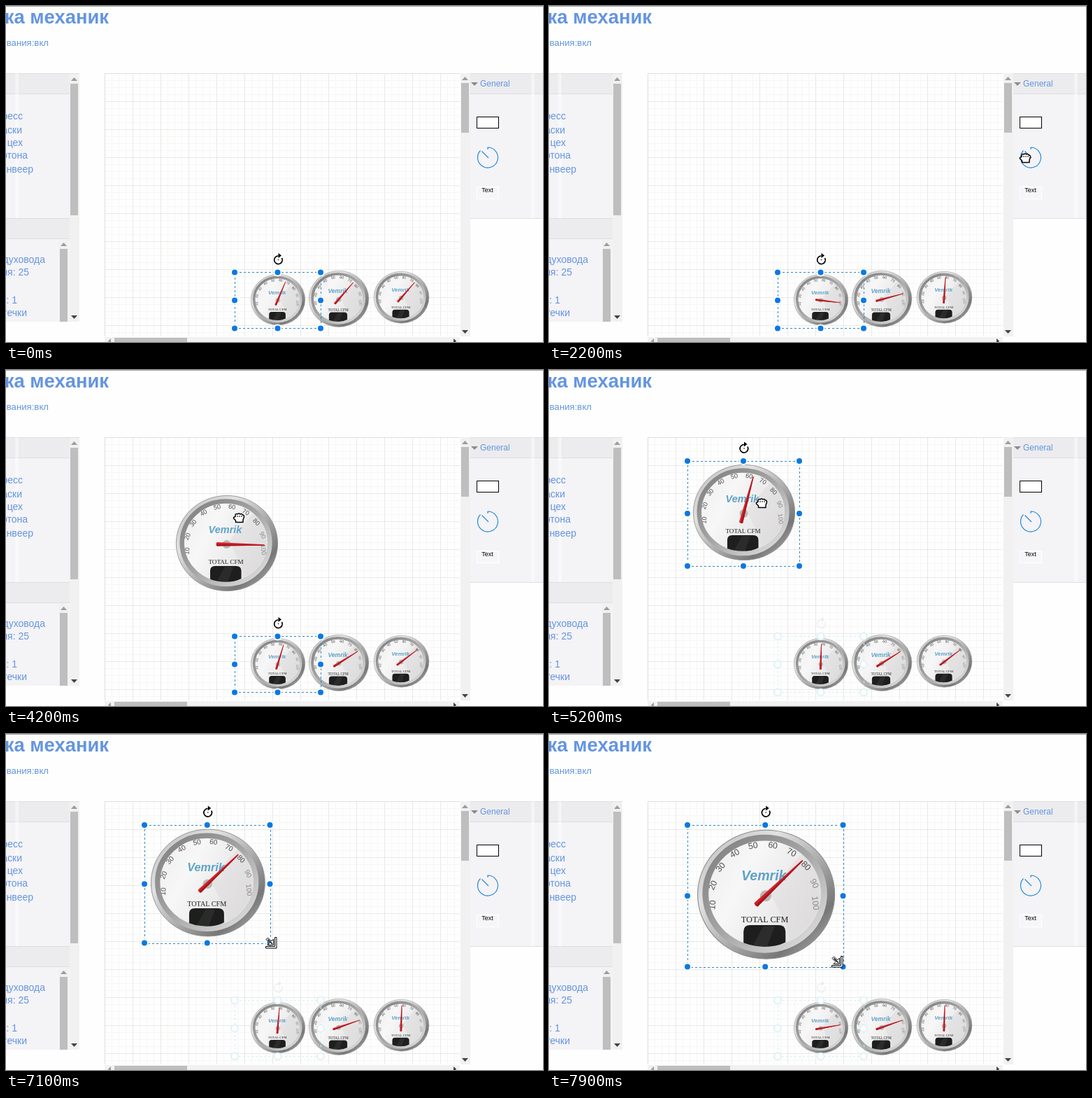
An HTML page that plays this animation: 768x480 px, repeating every 8000 ms.

```html
<!DOCTYPE html>
<html lang="ru">
<head>
<meta charset="utf-8">
<title>Panel editor</title>
<style>
  html, body { margin: 0; width: 100%; height: 100%; overflow: hidden; background: #fefefe; }
  svg { display: block; width: 768px; height: 480px; font-family: "Liberation Sans", Arial, sans-serif; }
  .blue { fill: #6495e0; }
  .end { text-anchor: end; }
  .mid { text-anchor: middle; }
  .line { fill: none; stroke: #dedee0; }
  .dash { fill: none; stroke: #2f86c8; stroke-dasharray: 3 3; shape-rendering: crispEdges; }
  .dot { fill: #0b78e3; stroke: #fff; stroke-width: 2; }
  .ghost .dash { stroke: #d3f0f8; }
  .ghost .dot { fill: #fdfefe; stroke: #dceff4; stroke-width: 1.500; }
  .ghost .turn { opacity: .05; }
</style>
</head>
<body>
<svg viewBox="0 0 768 480">
  <defs>
    <linearGradient id="rim" x1="0.1" y1="0.1" x2="0.9" y2="0.9">
      <stop offset="0" stop-color="#c4c4c4"/>
      <stop offset="0.25" stop-color="#e2e2e2"/>
      <stop offset="0.55" stop-color="#b0b0b0"/>
      <stop offset="0.85" stop-color="#777"/>
      <stop offset="1" stop-color="#a0a0a0"/>
    </linearGradient>
    <linearGradient id="bevel" x1="0.1" y1="0.1" x2="0.9" y2="0.9">
      <stop offset="0" stop-color="#858585"/>
      <stop offset="0.5" stop-color="#a6a6a6"/>
      <stop offset="1" stop-color="#d8d8d8"/>
    </linearGradient>
    <linearGradient id="dial" x1="0" y1="0" x2="1" y2="0.5">
      <stop offset="0" stop-color="#ededed"/>
      <stop offset="0.4" stop-color="#f8f7f7"/>
      <stop offset="1" stop-color="#e2e1e1"/>
    </linearGradient>
    <pattern id="minor" x="141" y="96" width="10" height="10" patternUnits="userSpaceOnUse">
      <path d="M.5 0V10M0 .5H10" fill="none" stroke="#f6f6f5"/>
    </pattern>
    <pattern id="major" x="141" y="96" width="40" height="40" patternUnits="userSpaceOnUse">
      <path d="M.5 0V40M0 .5H40" fill="none" stroke="#e8e8e7"/>
    </pattern>
    <clipPath id="view"><rect x="141" y="96" width="508" height="376"/></clipPath>
  </defs>

  <rect width="768" height="480" fill="#fefefe"/>
  <path d="M0 .5H768" stroke="#a9a9a9"/>
  <text class="blue end" x="147" y="25" font-size="27.4" font-weight="bold">тка механик</text>
  <text class="blue end" x="61" y="57" font-size="13.2">обслуживания:вкл</text>

  <!-- left panel -->
  <rect y="96" width="105" height="355" fill="#f4f3f6"/>
  <path d="M0 96H91V125H0ZM0 304H91V333H0Z" fill="#ececee"/>
  <path class="line" d="M0 96.500H105M0 125.500H91M0 303.500H91M0 332.500H91"/>
  <rect x="13" y="96" width="5" height="207" fill="#fff" opacity=".4"/>
  <g id="lists" class="blue end" font-size="14"></g>
  <path d="M91 97H105V451H91ZM76 334H89V451H76Z" fill="#f1f1f2"/>
  <path d="M92 111H103V299H92ZM77 347H88V451H77Z" fill="#bebebe"/>
  <path d="M93 107L97.500 102L102 107ZM78 343L82.500 338L87 343Z" fill="#9c9c9c"/>
  <path d="M93 442H102L97.500 447Z" fill="#444"/>

  <!-- drawing area -->
  <rect x="141" y="96" width="508" height="376" fill="url(#minor)"/>
  <rect x="141" y="96" width="508" height="376" fill="url(#major)"/>
  <path class="line" d="M141.500 472V96.500H649"/>
  <path d="M650 96H664V472H650ZM141 473H649V480H141Z" fill="#f1f1f2"/>
  <path d="M651 110H662V181H651ZM155 474H259V480H155Z" fill="#bebebe"/>
  <path d="M652 106L656.500 101L661 106ZM150 475V480H147L146 478.500Z" fill="#9c9c9c"/>
  <path d="M652 463H661L656.500 468ZM640 475V480H643L644 478.500Z" fill="#444"/>

  <!-- shape palette -->
  <rect x="664" y="96" width="104" height="207" fill="#f4f3f6"/>
  <rect x="664" y="96" width="104" height="29" fill="#ececee"/>
  <path class="line" d="M664 96.500H768M664 125.500H768M664 303.500H768"/>
  <rect x="751" y="96" width="5" height="207" fill="#fff" opacity=".4"/>
  <path d="M665 109H675L670 114Z" fill="#8b8b8b"/>
  <text class="blue" x="678" y="115" font-size="12">General</text>
  <rect x="673.500" y="158.500" width="31" height="16" fill="#fff" stroke="#000"/>
  <path d="M689 205V202A14.500 14.500 0 1 1 678.500 206.500M680.500 207.500L690 217" fill="none" stroke="#1c86d8" stroke-width="1.100"/>
  <rect x="673.500" y="258.500" width="31" height="17" fill="#f6f5f8" stroke="#fff"/>
  <text class="mid" x="688.500" y="266" font-size="9">Text</text>

  <g id="scene" clip-path="url(#view)"></g>
  <g id="picks"></g>
  <g id="hand" fill="#fff" stroke="#000" stroke-width="1.500" stroke-linejoin="round">
    <path d="M-4.500 6.500V4L-7.500 1Q-8-1-5-1.500V-4Q-4-6.500-2-5Q0-7 2-5Q4-6.500 5-4Q7.500-4.500 7.500-1L6 3V6.500Z"/>
    <path d="M-2-3V-1M1-3V-1M4-3V-1" stroke-width="1"/>
  </g>
  <g id="resize" fill="#fff" stroke="#000">
    <path d="M5.500-7.500H8V8H-7.500V5.500H5.500Z"/>
    <path d="M-4.500-7L.5-2L3.500-5V3.500H-5L-2 .5L-7-4.500Z"/>
    <path d="M-4.500-4.500L2 2" stroke-width="1.500"/>
  </g>
</svg>
<script>
const LOOP = 8000, STEP = 100, MOVE = 400;
const W = 160, H = 150;
const $ = id => document.getElementById(id);
const place = (el, x, y, s = 1) => el.setAttribute('transform', `translate(${x} ${y}) scale(${s})`);
const show = (el, on) => el.setAttribute('visibility', on ? 'visible' : 'hidden');

$('lists').innerHTML = [
  ['Пресс', 24, 162], ['Окраски', 23, 182], ['цех', 24, 200], ['Картона', 31, 218], ['Конвеер', 39, 238],
  ['духовода', 56, 367], ['Давления: 25', 33, 385], ['Уровень: 1', 16, 425], ['Утечки', 30, 443]
].map(([s, x, y]) => `<text x="${x}" y="${y}">${s}</text>`).join('');

function gaugeMarkup() {
  let marks = '';
  for (let i = 0; i < 10; i++) {
    const a = -100 + 22 * i, r = a * Math.PI / 180;
    const x = 78.5 + 55.5 * Math.sin(r), y = 75 - 54.5 * Math.cos(r);
    const tone = i < 8 ? '#4c4c4c' : '#8a8a8a';
    marks += `<text transform="translate(${x} ${y}) rotate(${a * 0.85})" y="3.2" fill="${tone}">${10 * (i + 1)}</text>`;
  }
  return `
    <ellipse cx="81" cy="73.500" rx="72.600" ry="68.100" fill="url(#rim)" stroke="#8c8c8c" stroke-width=".8"/>
    <ellipse cx="79.500" cy="72.800" rx="62.500" ry="59" fill="url(#dial)"/>
    <path d="M84 70L121 28Q138 46 137 84Q130 108 106 122L102 105Z" fill="#dad8d8" opacity=".45"/>
    <g class="mid" font-size="9">${marks}</g>
    <text class="mid" x="78.500" y="58.800" font-size="14.500" font-weight="bold" font-style="italic" fill="#5da3c6">Vemrik</text>
    <text class="mid" x="79.500" y="103" font-size="9.100" fill="#222" font-family="Liberation Serif, Times, serif">TOTAL CFM</text>
    <path d="M57 127V113Q57 106 64 106H94Q101.500 106 101.500 113V124Q92 129 79 130Q66 130 57 127Z" fill="#1d1e1d"/>
    <path d="M66 129L78 107H90L82 129Z" fill="#343634" opacity=".6"/>
    <ellipse cx="79.500" cy="72.800" rx="62.800" ry="59.300" fill="none" stroke="url(#bevel)" stroke-width="6.500"/>
    <circle cx="80.500" cy="75" r="6" fill="#b9b7b7"/>
    <g class="needle">
      <path d="M77.300 88.500Q80 90.500 82.700 88.500L80.700 20.500H79.300Z" fill="#d3242b"/>
      <path d="M80 89L82.700 88.500L80.700 20.500H80Z" fill="#a5161d"/>
    </g>`;
}

function addGroup(parent, markup) {
  const g = document.createElementNS('http://www.w3.org/2000/svg', 'g');
  g.innerHTML = markup;
  $(parent).append(g);
  return g;
}

// turns: [start time, angle]; each change takes MOVE ms
function makeGauge(turns) {
  const g = addGroup('scene', gaugeMarkup());
  return { g, turns, needle: g.querySelector('.needle') };
}

const makePick = () => addGroup('picks', '<rect class="dash"/>' +
  '<circle class="dot" r="5"/>'.repeat(8) +
  `<g class="turn"><circle r="8" fill="#fff" opacity=".8"/>
   <path d="M0-4.500A5.800 5.800 0 1 0 5-1.500" fill="none" stroke="#000" stroke-width="1.700"/>
   <path d="M0-8.500V-1.500L4.500-5Z"/><circle cy="1" r=".8"/></g>`);

function setPick(g, x, y, w, h) {
  const box = g.querySelector('.dash');
  const edges = { x: Math.floor(x) + 0.5, y: Math.floor(y) + 0.5, width: Math.round(w), height: Math.round(h) };
  Object.entries(edges).forEach(([k, v]) => box.setAttribute(k, v));
  const dots = g.querySelectorAll('.dot');
  let n = 0;
  for (let j = 0; j < 3; j++)
    for (let i = 0; i < 3; i++)
      if (i !== 1 || j !== 1) place(dots[n++], x + w * i / 2, y + h * j / 2);
  place(g.querySelector('.turn'), x + w / 2 + 1, y - 19);
}

// linear path through [time, a, b] points
function along(keys, t) {
  if (t <= keys[0][0]) return keys[0].slice(1);
  for (let i = 1; i < keys.length; i++) {
    const [p, q] = [keys[i - 1], keys[i]];
    if (t <= q[0]) {
      const k = (t - p[0]) / (q[0] - p[0]);
      return [p[1] + (q[1] - p[1]) * k, p[2] + (q[2] - p[2]) * k];
    }
  }
  return keys[keys.length - 1].slice(1);
}

function angleAt(turns, t) {
  let a = turns[0][1];
  for (const [start, to] of turns) {
    if (t < start) break;
    const k = Math.min(1, (t - start) / MOVE);
    a += (to - a) * k * k * (3 - 2 * k);
  }
  return a;
}

const big = makeGauge([[0, 91], [4500, 15], [6200, 46.5]]);
const small = [
  [345.8, 380.4, 0.533, [[0, 23], [900, 97], [2900, 17], [4500, 2], [5800, 5], [7200, 80]]],
  [428.3, 375, 0.589, [[0, 41], [1400, 75], [2900, 85], [3700, 58], [5800, 71]]],
  [521.5, 376.3, 0.543, [[0, 41], [1200, 4], [3000, 67], [3700, 53], [6200, 2]]]
].map(([x, y, s, turns]) => {
  const gauge = makeGauge(turns);
  place(gauge.g, x, y, s);
  return gauge;
});
const gauges = [big, ...small];

const oldPick = makePick(), newPick = makePick();
setPick(oldPick, 327, 380.5, 123, 80);

const DROP = 5000, GRIP = 6000;
const handPath = [[300, 785, 160], [900, 704, 182], [1700, 681, 217], [2700, 681, 217], [3600, 345, 255],
  [3700, 345, 255], [4200, 333, 211], [4900, 304, 190], [5300, 304, 190], [6000, 358, 280]];
const gripPath = [[6000, 360, 281], [6500, 360, 281], [7100, 379, 298], [7900, 412, 325]];
const gaugePath = [[3700, 241, 196], [4200, 235, 174], [4800, 198, 130]];
const sizePath = [[6500, W, H], [7100, 179.5, 168.5], [7900, 222.5, 202.5]];

function draw(t) {
  for (const { needle, turns } of gauges)
    needle.setAttribute('transform', `rotate(${angleAt(turns, t)} 80 75)`);

  const [x, y] = along(gaugePath, t), [w, h] = along(sizePath, t);
  const s = Math.min(w / W, h / H);
  place(big.g, x + (w - W * s) / 2, y + (h - H * s) / 2, s);
  show(big.g, t >= 3500);

  oldPick.classList.toggle('ghost', t >= DROP);
  setPick(newPick, x, y, w, h);
  show(newPick, t >= DROP);

  place($('hand'), ...along(handPath, t));
  show($('hand'), t < GRIP);
  place($('resize'), ...along(gripPath, t));
  show($('resize'), t >= GRIP);
}

function tick(now) {
  draw(Math.floor(now % LOOP / STEP) * STEP);
  requestAnimationFrame(tick);
}
draw(0);
requestAnimationFrame(tick);
</script>
</body>
</html>
```
